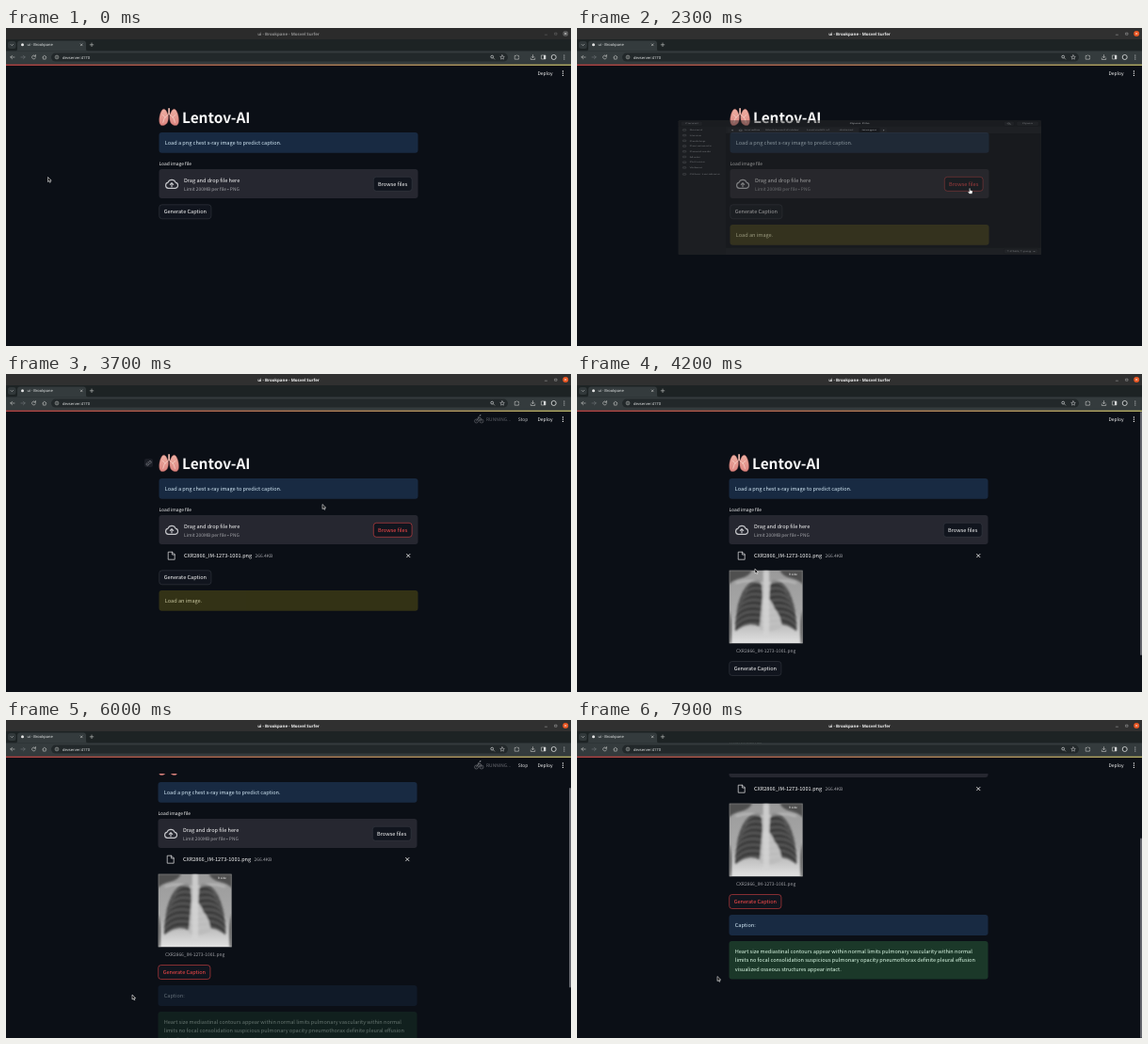
These frames come from a looping animation (600x338 px, 8000 ms). An HTML page:

```html
<!DOCTYPE html>
<html lang="en">
<head>
<meta charset="utf-8">
<title>X-ray captioning demo</title>
<style>
html, body { margin: 0; width: 100%; height: 100%; overflow: hidden; background: #0b0f16; }
svg { display: block; width: 100%; height: 100%; }
text { font-family: 'Noto Sans', 'Open Sans', sans-serif; text-rendering: geometricPrecision; white-space: pre; }
.app text { font-family: 'Noto Sans CJK JP', 'Noto Sans CJK SC', 'Noto Sans CJK', 'Noto Sans', sans-serif; }
.hot rect { stroke: #ff4b4b; }
.hot text { fill: #ff4b4b; }
</style>
</head>
<body>
<svg id="stage" viewBox="0 0 600 338" xmlns="http://www.w3.org/2000/svg"></svg>
<script>
const LOOP = 8000, STEP = 100;
const WHITE = '#fafafa', GREY = '#a3a4a9', BG = '#0b0f16';
const FILE = 'CXR2866_IM-1273-1001.png';
const ROW = 7.21, LIST_TOP = 57.7, SELECTED = 8;

const text = (x, y, s, size, fill = WHITE, attrs = '') =>
  `<text x="${x}" y="${y}" font-size="${size}" fill="${fill}" ${attrs}>${s}</text>`;
const box = (x, y, w, h, r, fill, attrs = '') =>
  `<rect x="${x}" y="${y}" width="${w}" height="${h}" rx="${r}" fill="${fill}" ${attrs}/>`;
const line = (d, stroke = '#c4c7c5', w = .6, attrs = '') =>
  `<path d="${d}" fill="none" stroke="${stroke}" stroke-width="${w}" stroke-linecap="round" stroke-linejoin="round" ${attrs}/>`;
const shape = (d, fill, attrs = '') => `<path d="${d}" fill="${fill}" ${attrs}/>`;
const dot = (x, y, r, fill, attrs = '') => `<circle cx="${x}" cy="${y}" r="${r}" fill="${fill}" ${attrs}/>`;
const group = (id, body, attrs = '') => `<g id="${id}" ${attrs}>${body}</g>`;
const MID = 'text-anchor="middle"', END = 'text-anchor="end"', BOLD = ' font-weight="700" ';
const button = (x, y, w, label) =>
  box(x, y, w, 15, 3, '#11151e', 'stroke="#3d4048" stroke-width=".5"') +
  text(x + w / 2, y + 9.6, label, 5.58, WHITE, MID);

// Browser window
function browser() {
  const dots = (x, y) => [-2, 0, 2].map(d => dot(x, y + d, .6, '#d5d7d8')).join('');
  return box(0, 0, 600, 12, 0, '#303030', 'id="titlebar"') +
    group('caption', text(300, 7.6, 'ui - Brookpane - Mosvel Surfer', 4.4, '#f2f2f2', BOLD + MID) +
      line('M572.3 7.2h2.2M583 5.2h2v2h-2z', '#d0d0d0', .4)) +
    dot(594.2, 6, 3, '#e95420', 'id="close"') + line('M593.3 5.1l1.8 1.8M595.1 5.1l-1.8 1.8', '#fff', .5) +
    box(0, 12, 600, 12.5, 0, '#1d2324') +
    box(2, 14, 8.5, 8, 2.5, '#31383a') + line('M5 17.4l1.3 1.3 1.3-1.3') +
    shape('M10 24.5q2 0 2-2v-6q0-3 3-3h67q3 0 3 3v6q0 2 2 2z', '#343b3d') +
    dot(17.5, 17.8, 1.5, '#e4e4e4') + text(22.5, 19.3, 'ui · Brookpane', 4, '#e3e5e5') +
    line('M79.2 16.9l1.9 1.9M81.1 16.9l-1.9 1.9M89.2 17.8h3.6M91 16v3.6') +
    box(0, 24.3, 600, 14.4, 0, '#343b3d') + box(48, 26.6, 485, 9, 4.5, '#22282a') +
    line('M9 31h-4.2m1.8-1.8l-1.8 1.8 1.8 1.8') + line('M16 31h4.2m-1.8-1.8l1.8 1.8-1.8 1.8', '#717779') +
    line('M31.3 30a2 2 0 1 0 .1 1.8M31.5 28.6v1.6h-1.6M38.8 31l2-2 2 2M39.4 30.7v2.4h2.8v-2.4') +
    dot(54, 31, 1.9, 'none', 'stroke="#c4c7c5" stroke-width=".5"') + line('M54 30.9v1M54 29.9v.1') +
    text(60, 32.6, 'devserver:4170', 4.05, '#e3e5e5') +
    dot(516.2, 30.6, 1.4, 'none', 'stroke="#d5d7d8" stroke-width=".7"') + line('M517.3 31.7l1.4 1.4') +
    line('M527 28.8l.7 1.5 1.6.2-1.2 1.1.3 1.6-1.4-.8-1.4.8.3-1.6-1.2-1.1 1.6-.2z', '#d5d7d8', .5) +
    line('M540.6 29.4h1.2q.7-1.4 1.4 0h1.2v1.3q1.4.6 0 1.3v1.2h-3.8z') +
    line('M559.5 28.6v3m-1.3-1.2l1.3 1.3 1.3-1.3M557.3 32v1.5h4.4v-1.5') +
    line('M568.8 29h4.2v4h-4.2z') + box(571, 29, 2, 4, 0, '#d5d7d8') +
    dot(581.7, 31, 2.5, '#272d2f', 'stroke="#e8eaea" stroke-width=".8"') + dots(592.8, 31) +
    box(0, 38.7, 600, 1.1, 0, 'url(#ribbon)');
}

// Web app
function lungs() {
  const lobe = shape('M173.8 92.6c1.4-2.6 2.4-6.4 4.7-6.4 3 0 5.2 7.4 4.9 13-.2 4.2-2.8 5-5.4 4-3.2-1.2-4.4-3.6-4.2-10.6z',
      'url(#flesh)', 'stroke="#b9645f" stroke-width=".4"') +
    line('M174 92l4 3.8 1.4 4.6M177 95l2.8-2.6', '#f6cfc4', .8);
  return lobe + `<g transform="matrix(-1 0 0 1 346.2 0)">${lobe}</g>` + line('M173.1 85.8v5.8', '#f0bdb0', 1.7);
}

function page() {
  const block = (y, h, fill) => box(162.5, y, 275, h, 3, fill);
  const report = ['Heart size mediastinal contours appear within normal limits pulmonary vascularity within normal',
    'limits no focal consolidation suspicious pulmonary opacity pneumothorax definite pleural effusion',
    'visualized osseous structures appear intact.'];
  return lungs() + text(187, 101, 'Lentov-AI', 15.4, WHITE, BOLD) +
    group('anchor', box(147, 90, 9, 9, 2, '#1a1d25') +
      line('M150.8 95.6l1.6-1.6M151.2 93.6l1-1a1.3 1.3 0 0 1 1.8 1.8l-1 1M152 96l-1 1a1.3 1.3 0 0 1-1.8-1.8l1-1', '#92949b', .6)) +
    block(111, 21.8, '#182a42') + text(168.8, 124.2, 'Load a png chest x-ray image to predict caption.', 5.58, '#d3e9f6') +
    text(162.5, 145.8, 'Load image file', 4.9) +
    block(150, 31, '#262730') +
    line('M172.4 170.4a3.2 3.2 0 0 1-.3-6.3 4.2 4.2 0 0 1 7.9 0 3.2 3.2 0 0 1-.2 6.3zM176 168.8v-4m-1.7 1.6l1.7-1.7 1.7 1.7', '#c6c7cb', 1.1) +
    text(189, 163.8, 'Drag and drop file here', 5.58) + text(189, 173, 'Limit 200MB per file • PNG', 4.9, GREY) +
    group('browse', button(390.3, 158.3, 40.8, 'Browse files')) +
    group('fileRow', line('M172.6 189.2h4l2.6 2.6v5.4h-6.6zM176.4 189.2v2.8h2.8', '#e8e8ea', .7) +
      text(189, 195, FILE, 5.58) + text(264.5, 195, '266.4KB', 4.9, GREY) +
      line('M425.6 191.4l3.4 3.4M429 191.4l-3.4 3.4', WHITE, .8)) +
    group('photo', '<use href="#xray" x="162.5" y="208.5" width="78.3" height="78"/>' +
      text(201.6, 296.3, FILE, 4.9, GREY, MID)) +
    group('generate', button(162.7, 187.8, 55.2, 'Generate Caption')) +
    group('warning', block(209, 21.8, '#3e3b16') + text(168.8, 222.2, 'Load an image.', 5.58, '#f5f3c0')) +
    group('results', block(327, 22, '#182a42') + text(168.8, 340.1, 'Caption:', 5.58, '#d3e9f6') +
      block(355, 40.5, '#1b3829') +
      report.map((s, i) => text(168.8, 367.8 + i * 9.6, s, 5.58, '#dffde9')).join(''));
}

function header() {
  return box(0, 38, 600, 19, 0, BG) +
    text(564.5, 50, 'Deploy', 4.9) + [46, 48.2, 50.4].map(y => dot(591.4, y, .65, WHITE)).join('') +
    group('running', dot(499.5, 50, 2, 'none', 'stroke="#8b8d93" stroke-width=".5"') +
      dot(505, 50, 2, 'none', 'stroke="#8b8d93" stroke-width=".5"') +
      line('M499.5 50l2-3.4h2.5l1 3.4M501.5 46.6l1.2 3M501.6 45.6l2-1.2', '#8b8d93', .6) + dot(503.8, 43.8, .7, '#8b8d93') +
      text(510, 50, 'RUNNING...', 4.9, '#6d6f76') + text(543.7, 50, 'Stop', 4.9, '#e0e0e2'));
}

function xray() {
  let ribs = '';
  for (let i = 0; i < 8; i++) {
    const y = 15 + i * 6.4, w = 23 + Math.min(i, 4) * 2.6;
    ribs += line(`M38 ${y}Q${40 - w * .7} ${y - 6} ${40 - w} ${y + 8}M42 ${y}Q${40 + w * .7} ${y - 6} ${40 + w} ${y + 8}`, '#ddd', 1.5, 'opacity=".24"');
  }
  const lung = shape('M34 12C22 8 14 21 9 41 7 52 6 61 7 67 16 58 29 57 35 63 37 48 37 24 34 12z', '#3c3c3c');
  return `<symbol id="xray" viewBox="0 0 80 80" preserveAspectRatio="none">` +
    box(0, 0, 80, 80, 0, 'url(#film)') +
    `<g filter="url(#soft)">${shape('M0 0h25q-3 7-13 9Q3 11 0 16zM80 0H55q3 7 13 9 9 2 12 7zM0 44q4 10 2 36H0zM80 44q-4 10-2 36h2z', '#505050')}` +
    `${lung}<g transform="matrix(-1 0 0 1 80 0)">${lung}</g>` +
    shape('M36 30q9-2 13 11 8 9 8 21-14 8-24 2z', '#bdbdbd') +
    box(37, 0, 6.5, 72, 2, '#d4d4d4', 'opacity=".85"') + ribs +
    line('M36 14Q24 9 8 14M44 14Q56 9 72 14', '#ddd', 2, 'opacity=".45"') + '</g>' +
    text(65, 5.6, 'R side', 3.2, '#eee') + '</symbol>';
}

// File dialog
const files = `1561_IM-0367-1001 140.1,2644_IM-1145-1001 181.7,2406_IM-0954-1001 185.0,1252_IM-0170-1002 177.0,
3040_IM-1414-12012 178.0,2468_IM-0998-2001 166.9,3207_IM-1514-2001 169.4,477_IM-2101-2001 176.2,2866_IM-1273-1001 266.4,
110_IM-0067-2001 176.9,3430_IM-1659-1001 166.3,112_IM-0080-1001 206.9,1898_IM-0581-2001 174.2,2463_IM-0996-1001 144.2,
1686_IM-0450-1002 217.5,3925_IM-1999-1004003 212.1,375_IM-1874-2001 176.0,3485_IM-1694-3003 213.6,1042_IM-0034-1001 197.5,
1144_IM-0097-1001 203.6,3763_IM-1883-1001 167.8,3705_IM-1850-2001 185.6,3375_IM-1624-1001 204.3,286_IM-1267-3001 195.5,
401_IM-2051-2001 224.9,105_IM-0037-1001 230.5,2542_IM-1053-2001 138.3,2880_IM-1370-1003002 215.7,1987_IM-0644-1001 184.4,
1346_IM-0224-4001 109.5,3696_IM-1782-3001 129.5,3693_IM-1844-1001 198.5,2454_IM-0989-1001 207.4,2321_IM-0894-2001 187.5`
  .split(',').map(s => s.trim().split(' '));

function dialog() {
  const INK = '#f2f2f2', SIZE = 4.38;
  const key = (x, w, label) => box(x, 23, w, 10, 1.5, '#3b3b3b', 'stroke="#222" stroke-width=".4"') +
    text(x + w / 2, 29.6, label, SIZE, INK, MID);
  const places = ['Recent', 'Home', 'Desktop', 'Documents', 'Downloads', 'Music', 'Pictures', 'Videos', 'Other Locations'];
  const crumbs = [[177.5, 'tomelba'], [200, 'WorkbenchFolder'], [244, 'LentovAR-v1'], [278.5, 'dataset'], [302.5, 'images']];
  const rowY = i => LIST_TOP + i * ROW + 5.1;
  return box(107.7, 21, 385.3, 297.2, 2, '#353535') +
    box(107.7, 21, 385.3, 13.5, 2, '#2d2d2d') + key(110.5, 22.5, 'Cancel') + key(467, 23, 'Open') + key(453.5, 10.5, '') +
    dot(458.4, 27.6, 1.3, 'none', 'stroke="#ddd" stroke-width=".6"') + line('M459.5 28.7l1 1', '#ddd') +
    text(300, 29.6, 'Open File', 4.5, '#fff', BOLD + MID) +
    box(107.7, 34.5, 50.3, 283.5, 0, '#313131') +
    places.map((s, i) => {
      const y = 42 + i * 11.9 + (i === 8 ? 2.8 : 0);
      return box(112.4, y - 1.6, 3.4, 3.2, .6, 'none', 'stroke="#cfcfcf" stroke-width=".5"') + text(119.6, y + 1.5, s, 4.3, INK);
    }).join('') +
    box(160, 37.3, 169, 10.4, 1.5, '#3d3d3d') + box(299.5, 37.3, 22, 10.4, 0, '#292929') +
    shape('M165.6 40.8v3.4l-1.8-1.7zM325 40.8v3.4l1.8-1.7z', '#ddd') +
    line('M172 42.6l1.7-1.6 1.7 1.6M172.5 42.4v1.8h2.4v-1.8', '#ddd') +
    crumbs.map(([x, s]) => text(x, 44, s, 4.3, INK, s === 'images' ? BOLD : '')).join('') +
    box(158, 49.5, 334.5, 254, 0, '#292929') +
    group('rowHover', box(158, LIST_TOP, 251, ROW, 0, '#4c4c4c')) +
    group('rowPicked', box(158, LIST_TOP + SELECTED * ROW, 251, ROW, 0, '#dc4b1c')) +
    group('names', text(160.5, 55.4, 'Name', SIZE, '#c9c9c9') +
      files.map(([n], i) => box(162, rowY(i) - 3.5, 4, 3.9, .6, '#b245cf') +
        dot(164, rowY(i) - 1.5, .8, '#f0d6f6') + text(168.3, rowY(i), `CXR${n}.png`, SIZE, INK)).join('')) +
    group('columns', text(350, 55.4, 'Size', SIZE, '#c9c9c9', END) + text(363.5, 55.4, 'Type', SIZE, '#c9c9c9') +
      text(381, 55.4, 'Modified', SIZE, '#c9c9c9') + shape('M402.8 55l1.6-2.2 1.6 2.2z', '#c9c9c9') +
      files.map(([, kb], i) => text(358.3, rowY(i), kb + ' kB', SIZE, INK, END) +
        text(363.5, rowY(i), 'Image', SIZE, INK) + text(381.3, rowY(i), '27 Apr 2016', SIZE, INK)).join('') +
      box(407.2, 59, 1.3, 12, .6, '#999')) +
    group('preview', box(409, 49.5, 83.5, 254, 0, '#383838') + text(452.8, 54.5, FILE, SIZE, INK, MID) +
      '<use href="#xray" x="412.8" y="132" width="79.4" height="98"/>') +
    box(158, 303.3, 335, 14.9, 0, '#353535') + box(453.5, 305.6, 36, 10, 1.5, '#3e3e3e', 'stroke="#222" stroke-width=".4"') +
    text(456.5, 312.1, '*.PNG,*.png', SIZE, INK) + shape('M484 309.8h3l-1.5 1.8z', '#ddd');
}

document.getElementById('stage').innerHTML = `<defs>
  <linearGradient id="ribbon"><stop stop-color="#e0504f"/><stop offset="1" stop-color="#e3dc7c"/></linearGradient>
  <linearGradient id="flesh" x2="0" y2="1"><stop stop-color="#efb0a4"/><stop offset="1" stop-color="#dc8580"/></linearGradient>
  <linearGradient id="film" x2="0" y2="1"><stop stop-color="#9a9a9a"/><stop offset=".6" stop-color="#a8a8a8"/><stop offset="1" stop-color="#e2e2e2"/></linearGradient>
  <filter id="soft"><feGaussianBlur stdDeviation="1.1"/></filter>${xray()}</defs>` +
  box(0, 0, 600, 338, 0, BG) +
  `<g class="app">${group('page', page())}${header()}</g>` +
  box(598, 40, 2, 298, 1, '#63656c', 'id="thumb"') + browser() +
  box(0, 0, 600, 338, 0, '#000', 'id="dim"') + group('dialog', dialog()) +
  group('cursor',
    '<path id="arrow" d="M0 0v5l1.2-1 .8 1.8 .9-.4-.8-1.8h1.6z" fill="#111" stroke="#fff" stroke-width=".55"/>' +
    '<path id="hand" d="M-.5 0q.6-.6 1.1 0v2l2 .5q.6.2.5.9l-.5 2.4h-3l-1.7-2.2q.2-.9 1.6.1z" fill="#fff" stroke="#111" stroke-width=".35"/>');

const el = Object.fromEntries([...document.querySelectorAll('[id]')].map(n => [n.id, n]));
const show = (node, opacity) => {
  node.setAttribute('opacity', +opacity);
  node.setAttribute('display', opacity > 0 ? 'inline' : 'none');
};
const move = (node, x, y) => node.setAttribute('transform', `translate(${x} ${y})`);
const within = (t, a, b) => t >= a && t < b;

// Each key is [time, ...values], eased between neighbours.
function track(keys, t) {
  const i = keys.findIndex(k => k[0] > t);
  if (i < 0) return keys.at(-1).slice(1);
  if (i === 0) return keys[0].slice(1);
  const a = keys[i - 1], b = keys[i], p = (t - a[0]) / (b[0] - a[0]), e = p * p * (3 - 2 * p);
  return a.slice(1).map((v, j) => v + (b[j + 1] - v) * e);
}

const cursorKeys = [[0, 44.5, 158.5], [200, 44.5, 158.5], [800, 190, 196], [1200, 190, 197], [1500, 240, 246],
  [2000, 417, 170.5], [2400, 417, 170.5], [2800, 235, 121], [2900, 235, 121], [3000, 270, 162], [3100, 284.5, 151.5],
  [3400, 477, 28], [3500, 477, 28], [3600, 410, 90], [3700, 336, 138.5], [4100, 210, 200], [4500, 75, 245],
  [4800, 181.5, 271], [5400, 181.5, 271], [6000, 134, 292], [6600, 140, 300], [7000, 159, 287.5], [7500, 149, 272.5], [8000, 149, 272.5]];
const scrollKeys = [[4200, 0], [4500, 45], [7300, 45], [7700, 120]];
const runKeys = [[3600, .8], [3900, 1], [6800, 1], [7000, .4], [7100, 0]];

function render(t) {
  const [scroll] = track(scrollKeys, t);
  const uploaded = t >= 3600, pictured = t >= 4000, reported = t >= 6000;

  const focused = t >= 800;
  el.titlebar.setAttribute('fill', focused ? '#303030' : '#2b2b2b');
  show(el.caption, focused ? 1 : .5);
  el.close.setAttribute('fill', focused ? '#e95420' : '#555');

  move(el.page, pictured ? -1 : 0, -scroll);
  show(el.anchor, within(t, 3600, 3800));
  show(el.fileRow, uploaded);
  show(el.photo, pictured);
  move(el.generate, 0, pictured ? 117.7 : uploaded ? 21 : 0);
  move(el.warning, 0, uploaded ? 21 : 0);
  show(el.warning, within(t, 1200, 4000) ? (uploaded ? .8 : 1) : 0);
  show(el.results, reported ? track([[7000, .42], [7200, 1]], t)[0] : 0);
  show(el.running, within(t, 1100, 1300) || within(t, 3600, 4200) || t >= 5400 ? track(runKeys, t)[0] : 0);
  el.generate.classList.toggle('hot', within(t, 700, 1900) || t >= 4700);
  el.browse.classList.toggle('hot', within(t, 1900, 4000));

  const height = 298 + (reported ? 120 : 45);
  el.thumb.setAttribute('y', 40 + scroll * 298 / height);
  el.thumb.setAttribute('height', 298 * 298 / height);
  show(el.thumb, pictured);

  const open = within(t, 2200, 3700);
  const [grow, solid] = track([[2200, .12, .12], [2300, .48, .45], [2400, .85, .85], [2500, 1, 1]], t);
  show(el.dialog, open ? solid : 0);
  el.dialog.setAttribute('transform', `translate(0 169.7) scale(1 ${grow}) translate(0 -169.7)`);
  show(el.dim, open ? track([[2400, 0], [2800, .36]], t)[0] : 0);
  const picked = t >= 2900, listed = t >= 2500;
  show(el.names, listed);
  show(el.columns, listed);
  show(el.rowPicked, picked);
  show(el.preview, picked);
  move(el.columns, picked ? 0 : 83, 0);

  const [, lagY] = track(cursorKeys, t - STEP);
  const row = Math.floor((lagY - LIST_TOP) / ROW);
  show(el.rowHover, within(t, 2600, 3300) && row >= 0);
  move(el.rowHover, 0, row * ROW);

  const [x, y] = track(cursorKeys, t);
  const pointing = within(t, 700, 1300) || within(t, 1900, 2500) || within(t, 4700, 5500);
  move(el.cursor, x, y);
  show(el.hand, pointing);
  show(el.arrow, !pointing);
}

const start = performance.now();
function tick() {
  const t = (performance.now() - start) % LOOP;
  render(Math.floor(t / STEP) * STEP);
  requestAnimationFrame(tick);
}
tick();
</script>
</body>
</html>
```
